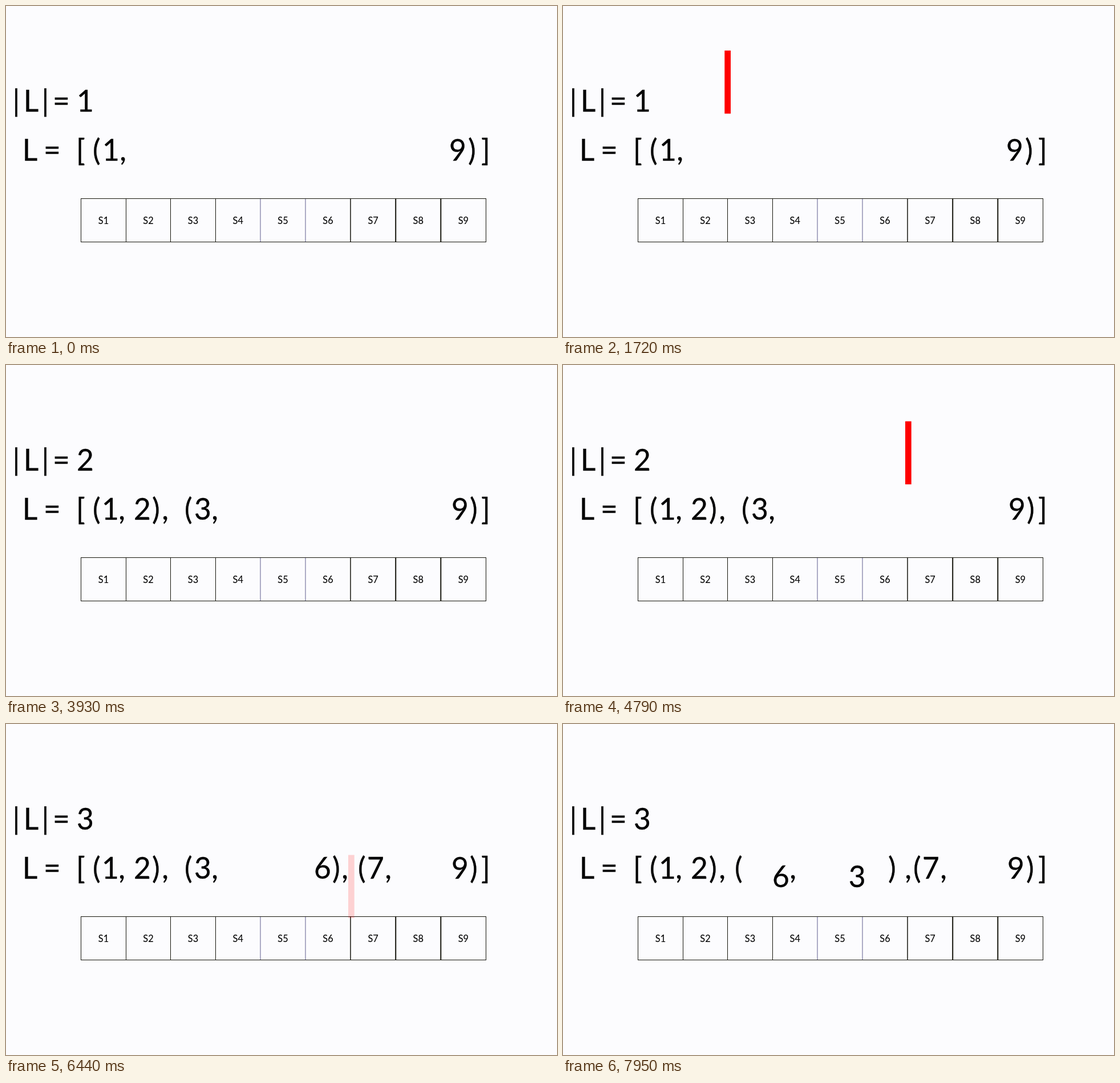
Animation, 966 px wide and 580 px high, one loop 7990 ms. Source, as an HTML page:

```html
<!DOCTYPE html>
<html lang="en">
<head>
<meta charset="utf-8">
<title>Splitting a list of segments</title>
<style>
  html, body { margin: 0; width: 100%; height: 100%; overflow: hidden; background: #fcfcfe; }
  svg { display: block; width: 966px; height: 580px; }
  text { font: 51.5px Lato, sans-serif; text-anchor: middle; fill: #000; stroke: #000; stroke-width: .3px; }
  .label { font-size: 16.3px; stroke-width: .1px; }
  .bar { fill: #fe0000; }
</style>
</head>
<body>
<svg id="stage" viewBox="0 0 966 580"></svg>
<script>
const LOOP = 7990;
const ROW_1 = 184.7, ROW_2 = 271;
const SLIDE_2 = 3930, SLIDE_3 = 6560;
const stage = document.getElementById('stage');

function add(parent, tag, attrs = {}, content = '') {
  const node = document.createElementNS('http://www.w3.org/2000/svg', tag);
  for (const [key, value] of Object.entries(attrs)) node.setAttribute(key, value);
  node.textContent = content;
  return parent.appendChild(node);
}

// Each character is centred on its own x position.
function glyphs(parent, chars, xs, y = ROW_2) {
  const group = add(parent, 'g');
  [...chars].forEach((char, i) => add(group, 'text', { x: xs[i], y }, char));
  return group;
}

const sizeLine = n => glyphs(stage, '|L|=' + n, [18, 44, 69, 97, 139], ROW_1);
const bar = (parent, x) => add(parent, 'rect', { class: 'bar', x, width: 10.7, height: 110.5 });

// Segment table
const edges = [131.5, 210.5, 288.5, 367.5, 446, 525, 604, 683.2, 762.3, 841.5];
edges.forEach((x, i) => {
  const thin = i === 4 || i === 5;
  add(stage, 'path', {
    d: `M${x} 337.5V413.5`,
    stroke: thin ? '#5c5a8c' : '#15150c',
    'stroke-width': i === 7 || i === 8 ? 2 : i === 6 ? 1.5 : 1
  });
  if (i < 9) add(stage, 'text', { class: 'label', x: (x + edges[i + 1]) / 2, y: 382 }, 'S' + (i + 1));
});
add(stage, 'path', { d: 'M131 337.5H842M131 413.5H842', stroke: '#15150c' });

// Parts shared by all slides
glyphs(stage, 'L=[]', [42, 81, 131, 841]);
const sizes = [1, 2, 3].map(sizeLine);

const slides = [0, 1, 2].map(() => add(stage, 'g'));
glyphs(slides[0], '(1,9)', [159, 184, 205, 792, 817]);
const firstSplit = glyphs(slides[0], '2),(3,', [246, 268, 289, 325, 349, 371]);

const pair = '(1,2),', pairX = [159, 183, 203, 239, 263, 279];
glyphs(slides[1], pair + '(3,9)', [...pairX, 320, 345, 366, 796, 820]);
const secondSplit = glyphs(slides[1], '6),(7,', [555, 579, 594, 624, 648, 670]);

glyphs(slides[2], pair + '(,),(7,9)', [...pairX, 308, 403, 577, 605, 621, 645, 667, 794, 819]);
const three = glyphs(slides[2], '3', [0]);
const six = glyphs(slides[2], '6', [0]);

const splits = [
  { start: 990, top: 71, text: firstSplit, bar: bar(slides[0], 283.3) },
  { start: 3997, top: 84, text: secondSplit, bar: bar(slides[1], 600) }
];

const progress = (t, start, length) => Math.min(1, Math.max(0, (t - start) / length));
const ease = u => u < 0.5 ? 4 * u ** 3 : 1 - 4 * (1 - u) ** 3;
const mix = (a, b, p) => a + (b - a) * p;
const fade = (node, value) => node.setAttribute('opacity', value);
const show = (node, on) => node.setAttribute('visibility', on ? 'visible' : 'hidden');

// The bar fades in, drops, the split values fade in, the bar fades out.
function playSplit(split, t) {
  const s = t - split.start;
  const reveal = progress(s, 1515, 500);
  fade(split.bar, progress(s, 0, 500) * (1 - progress(s, 2030, 500)));
  split.bar.setAttribute('y', split.top + 145.5 * ease(progress(s, 500, 1000)));
  fade(split.text, reveal);
  return reveal;
}

function moveOnArc(node, from, to, p) {
  node.setAttribute('transform', `translate(${mix(from, to, p)} ${44 * Math.sin(Math.PI * p)})`);
}

function draw(t) {
  const current = t < SLIDE_2 ? 0 : t < SLIDE_3 ? 1 : 2;
  slides.forEach((slide, i) => show(slide, i === current));

  const [a, b] = splits.map(split => playSplit(split, t));
  fade(sizes[0], 1 - a);
  fade(sizes[1], a * (1 - b));
  fade(sizes[2], b);

  const swap = ease(progress(t, SLIDE_3, 2000));
  moveOnArc(three, 333, 539, swap);
  moveOnArc(six, 545.5, 361, swap);
}

let begin;
function tick(now) {
  begin ??= now;
  draw((now - begin) % LOOP);
  requestAnimationFrame(tick);
}
draw(0);
requestAnimationFrame(tick);
</script>
</body>
</html>
```
